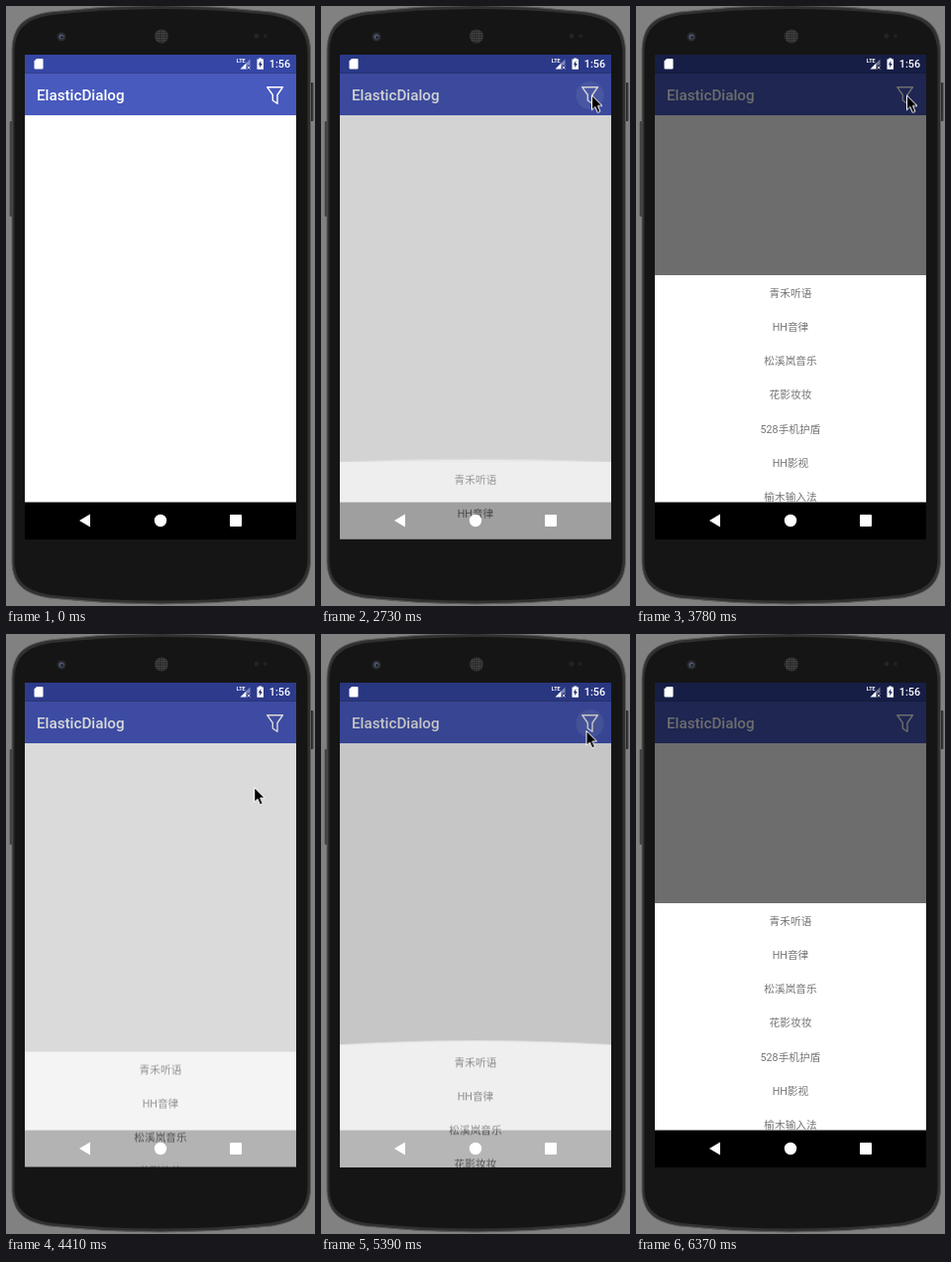
Animation, 312 px wide and 604 px high, one loop 6.72 s. Source, as an HTML page:

```html
<!DOCTYPE html>
<html lang="zh-CN">
<head>
<meta charset="utf-8">
<title>ElasticDialog</title>
<style>
html, body { margin: 0; width: 100%; height: 100%; overflow: hidden; background: #818181; }
svg { display: block; width: 312px; height: 604px; }
text { font-family: Roboto, "Noto Sans CJK SC", "Noto Sans CJK", sans-serif; }
.title { font-size: 15.2px; font-weight: 500; fill: #fff; }
.clock { font-size: 10.8px; font-weight: 500; fill: #fff; }
.lte { font-size: 5.4px; font-weight: 700; fill: #fff; }
.rows { font-size: 10.7px; fill: #757575; text-anchor: middle; }

.dim, .dialog, .bulge, .ripple, .pointer, .arrow {
  animation: 6720ms linear infinite;
}
.dim { animation-name: dim; }
.dialog { animation-name: slide; }
.bulge { animation-name: bulge; }
.ripple { animation-name: ripple; }
.pointer { animation-name: move; }
.arrow { animation-name: show; animation-timing-function: step-end; }

@keyframes dim {
  0%, 39.58% { opacity: 0; }
  39.59% { opacity: .097; }
  46.13%, 62.4% { opacity: .57; }
  66.7%, 78.45% { opacity: 0; }
  78.46% { opacity: .097; }
  85%, 100% { opacity: .57; }
}
@keyframes slide {
  0% { transform: translateY(266px); opacity: .47; }
  39.58%, 78.45% {
    transform: translateY(266px); opacity: .47;
    animation-timing-function: cubic-bezier(.333, .667, .667, 1);
  }
  46.13% { transform: none; opacity: 1; }
  62.4% {
    transform: none; opacity: 1;
    animation-timing-function: cubic-bezier(.333, 0, .667, .333);
  }
  66.7% { transform: translateY(266px); opacity: .47; }
  85%, 100% { transform: none; opacity: 1; }
}
@keyframes bulge {
  0%, 39.58% { transform: scaleY(0); }
  44.05% { transform: scaleY(10); animation-timing-function: ease-in-out; }
  50.6% { transform: scaleY(0); animation-timing-function: ease-out; }
  52.4% { transform: scaleY(3); animation-timing-function: ease-in; }
  54.2%, 78.45% { transform: scaleY(0); }
  82.92% { transform: scaleY(10); animation-timing-function: ease-in-out; }
  89.47% { transform: scaleY(0); animation-timing-function: ease-out; }
  91.27% { transform: scaleY(3); animation-timing-function: ease-in; }
  93.07%, 100% { transform: scaleY(0); }
}
@keyframes ripple {
  0%, 36.3% { transform: scale(.4); opacity: 0; }
  37.5%, 41% { transform: none; opacity: .1; }
  45%, 77% { transform: none; opacity: 0; }
  77.1% { transform: scale(.4); opacity: 0; }
  78.2%, 81% { transform: none; opacity: .1; }
  85%, 100% { transform: none; opacity: 0; }
}
@keyframes move {
  0%, 1.04% { transform: translate(258px, 548px); animation-timing-function: ease-out; }
  4.17%, 7.29% { transform: translate(256px, 300px); animation-timing-function: ease-in-out; }
  16.66%, 56.25% { transform: translate(273px, 89.5px); }
  59.38% { transform: translate(248px, 161px); }
  60.42%, 62.5% { transform: translate(246px, 172px); }
  67.71% { transform: translate(253px, 142px); }
  71.87%, 87.5% { transform: translate(267.5px, 97px); animation-timing-function: ease-in; }
  93.75%, 100% { transform: translate(262px, 600px); }
}
@keyframes show {
  0% { visibility: hidden; }
  1.04% { visibility: visible; }
  94.79%, 100% { visibility: hidden; }
}
</style>
</head>
<body>
<svg viewBox="0 0 312 604">
  <defs>
    <clipPath id="screen"><path d="M19 49H293V536.5H19Z"/></clipPath>
    <pattern id="mesh" width="2.4" height="2.4" patternUnits="userSpaceOnUse">
      <circle cx="1.2" cy="1.2" r=".75" fill="#595959"/>
    </pattern>
    <linearGradient id="key">
      <stop offset="0" stop-color="#5a5a5a"/><stop offset=".5" stop-color="#2a2a2a"/><stop offset="1" stop-color="#444"/>
    </linearGradient>
  </defs>

  <!-- phone body -->
  <rect width="312" height="604" fill="#818181"/>
  <rect x="3.5" y="116" width="4" height="96" rx="1" fill="url(#key)"/>
  <rect x="306.5" y="77" width="4" height="39" rx="1" fill="url(#key)"/>
  <path d="M6 44C7 18 20 10 44 6Q156 -7 268 6C292 10 306 18 307.500 44V560C306 584 292 592 268 596Q156 608 44 596C20 592 7 584 6 560Z" fill="#303030" stroke="#5c5c5c"/>
  <path d="M8.500 46C9 21 22 13 46 9Q156 -3 266 9C290 13 303 21 304.500 46V558C303 581 290 589 266 593Q156 604 46 593C22 589 9 581 8.500 558Z" fill="#151515"/>
  <circle cx="56" cy="31" r="4.500" fill="#292b30"/>
  <circle cx="56" cy="31" r="2.500" fill="#525a72"/>
  <circle cx="56.500" cy="31.500" r="1.200" fill="#10131c"/>
  <circle cx="157" cy="30.500" r="7" fill="#242424"/>
  <circle cx="157" cy="30.500" r="7" fill="url(#mesh)"/>
  <circle cx="253" cy="30" r="2.500" fill="#242424"/>
  <circle cx="262" cy="30" r="2" fill="#222"/>

  <!-- app -->
  <rect x="19" y="49" width="274" height="488" fill="#000"/>
  <rect x="19" y="49" width="274" height="18.500" fill="#3546a5"/>
  <rect x="19" y="67.500" width="274" height="42.500" fill="#485abe"/>
  <rect x="19" y="110" width="274" height="389.500" fill="#fff"/>
  <text class="title" x="31" y="94.500">ElasticDialog</text>
  <path d="M263.700 81.700H279.500L274 89.500V98.300L269.300 95V89.500Z" fill="none" stroke="#fff" stroke-width="1.400" stroke-linejoin="round"/>
  <g transform="translate(271.500 90)"><circle class="ripple" r="14" fill="#fff"/></g>
  <rect class="dim" x="19" y="49" width="274" height="450.500"/>

  <!-- sheet with its own black bar, moved as one window -->
  <g clip-path="url(#screen)">
    <g class="dialog">
      <rect x="19" y="271" width="274" height="229" fill="#fff"/>
      <g transform="translate(19 271)"><path class="bulge" d="M0 0Q137 -2 274 0Z" fill="#fff"/></g>
      <g class="rows">
        <text x="156" y="292.500">青禾听语</text>
        <text x="156" y="326.750">HH音律</text>
        <text x="156" y="361">松溪岚音乐</text>
        <text x="156" y="395.250">花影妆妆</text>
        <text x="156" y="429.500">528手机护盾</text>
        <text x="156" y="463.750">HH影视</text>
        <text x="156" y="498">榆木输入法</text>
      </g>
      <rect x="19" y="499.500" width="274" height="38"/>
    </g>
  </g>

  <!-- system icons stay bright above the dialog -->
  <g fill="#fff">
    <path d="M31 53H36.500Q37.500 53 37.500 54V62.500Q37.500 63.500 36.500 63.500H29.500Q28.500 63.500 28.500 62.500V55.500Z"/>
    <text class="lte" x="232.800" y="56.800">LTE</text>
    <path d="M236.500 63.500L242.500 57.500V63.500Z"/>
    <path d="M242.500 57.500L246.500 53.500V59.500H242.500Z" opacity=".4"/>
    <path d="M243.700 60.500L246.500 63.500M246.500 60.500L243.700 63.500" stroke="#fff" stroke-width=".8"/>
    <path d="M255.300 52.500H258.200V53.500H260V63.700H253.500V53.500H255.300Z"/>
    <path d="M257.300 55L254.800 59.200H256.300V62.200L258.800 58H257.300Z" fill="#27336f"/>
    <text class="clock" x="265.800" y="62.300">1:56</text>
    <path d="M74 518L85 511.500V524.500Z"/>
    <circle cx="156" cy="518" r="6.200"/>
    <rect x="226" y="512" width="12" height="12" rx="1"/>
  </g>

  <g class="pointer">
    <path class="arrow" d="M.5 .5V15.200L3.800 12L6.300 17.800L9 16.600L6.500 11H11Z" fill="#000" stroke="#fff"/>
  </g>
</svg>
<script>
const LOOP = 6720, STEP = 70;
const anims = document.getAnimations();
anims.forEach(a => a.pause());
let start;

// All keyframes advance together on a 70 ms beat.
function tick(now) {
  start ??= now;
  const t = Math.floor((now - start) % LOOP / STEP) * STEP;
  for (const a of anims) a.currentTime = t;
  requestAnimationFrame(tick);
}
requestAnimationFrame(tick);
</script>
</body>
</html>
```
